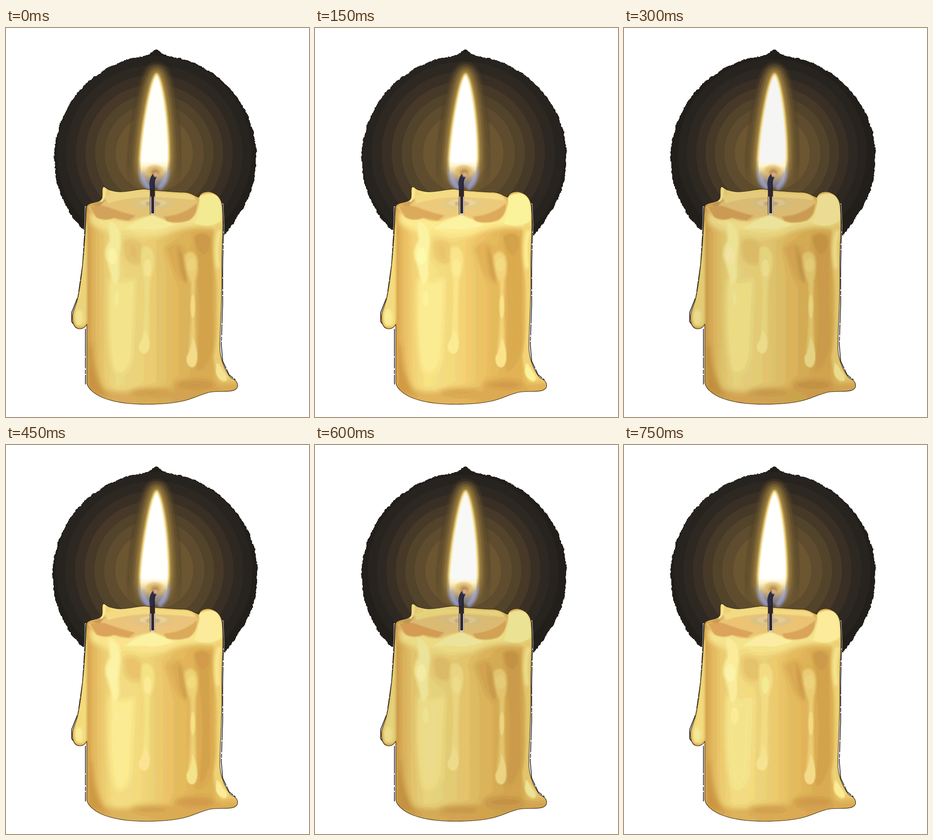
Write an HTML page that moves like this. It is 660 px wide and 848 px high and loops after 900 ms.

```html
<!DOCTYPE html>
<html lang="en">
<head>
<meta charset="utf-8">
<title>Candle</title>
<style>
  html, body { margin: 0; width: 100%; height: 100%; overflow: hidden; background: #fff; }
  svg { display: block; width: 660px; height: 848px; }
</style>
</head>
<body>
<svg viewBox="0 0 660 848" fill="none" stroke-linejoin="round" stroke-linecap="round">
  <defs>
    <filter id="soft1" x="-50%" y="-50%" width="200%" height="200%"><feGaussianBlur stdDeviation="1.2"/></filter>
    <filter id="soft3" x="-50%" y="-50%" width="200%" height="200%"><feGaussianBlur stdDeviation="2.4"/></filter>
    <filter id="soft8" x="-50%" y="-50%" width="200%" height="200%"><feGaussianBlur stdDeviation="6"/></filter>
    <filter id="tone" filterUnits="userSpaceOnUse" x="130" y="335" width="390" height="495" color-interpolation-filters="sRGB">
      <feComponentTransfer>
        <feFuncR class="gain" type="linear"/><feFuncG class="gain" type="linear"/><feFuncB class="gain" type="linear"/>
      </feComponentTransfer>
      <feComponentTransfer>
        <feFuncR class="step" type="discrete"/><feFuncG class="step" type="discrete"/><feFuncB class="step" type="discrete"/>
      </feComponentTransfer>
    </filter>

    <linearGradient id="wax" gradientUnits="userSpaceOnUse" x1="176" x2="472" y1="0" y2="0">
      <stop offset="0" stop-color="#d3a04a"/><stop offset=".05" stop-color="#deb35c"/>
      <stop offset=".12" stop-color="#e7c76d"/><stop offset=".22" stop-color="#eed981"/>
      <stop offset=".36" stop-color="#ecd57c"/><stop offset=".5" stop-color="#e8c96f"/>
      <stop offset=".63" stop-color="#e2bb60"/><stop offset=".8" stop-color="#daad54"/>
      <stop offset=".92" stop-color="#d9ac53"/><stop offset="1" stop-color="#e8c868"/>
    </linearGradient>
    <linearGradient id="flameFill" gradientUnits="userSpaceOnUse" x1="0" x2="0" y1="103" y2="352">
      <stop id="core0" offset="0"/><stop id="core1" offset=".75"/>
      <stop offset=".79" stop-color="#fff5cf"/><stop offset=".83" stop-color="#efd998"/>
      <stop offset=".88" stop-color="#c9ac72"/><stop offset=".92" stop-color="#a3968e" stop-opacity=".9"/>
      <stop offset=".97" stop-color="#8285a0" stop-opacity=".7"/><stop offset="1" stop-color="#6b6575" stop-opacity="0"/>
    </linearGradient>
    <linearGradient id="fade" gradientUnits="userSpaceOnUse" x1="0" x2="0" y1="285" y2="350">
      <stop stop-color="#fff"/><stop offset="1" stop-color="#000"/>
    </linearGradient>
    <mask id="upper" maskUnits="userSpaceOnUse" x="200" y="40" width="260" height="330">
      <path d="M200 40H460V370H200Z" fill="url(#fade)"/>
    </mask>

    <path id="flame" d="M328 103C336 112 344 155 348 195C352 235 354 270 352 305C351 330 345 348 332 352H312C299 348 292 330 293 300C294 265 300 215 308 172C314 140 321 110 328 103Z"/>
    <path id="body" d="M176 388C182 378 203 383 209 371C211 362 207 350 212 346C217 346 221 353 229 354C253 362 278 352 303 351C325 355 350 356 380 358C399 356 409 365 420 369C424 358 434 356 444 357C459 361 469 370 471 388C475 430 470 470 470 520C472 570 467 640 466 690C465 724 478 747 489 762C501 767 506 774 504 783C499 795 477 791 452 793C432 794 412 807 386 813C345 822 270 824 226 811C200 804 178 789 176 773V646C172 653 167 656 160 656C149 655 143 643 145 625C147 612 154 604 158 580C167 532 173 455 174 410Z"/>
    <clipPath id="inside"><use href="#body"/></clipPath>
    <clipPath id="haloEdge"><path id="haloClip"/></clipPath>
  </defs>

  <g id="halo" clip-path="url(#haloEdge)"></g>

  <!-- rough cut-out edge -->
  <g id="edges">
    <path d="M173 390V420L167 515L157 585L143 620V640L153 654M173 656V777"/>
    <path d="M472 384L474 430L472 520L472 600L469 690L472 726L486 756L500 767"/>
  </g>

  <!-- flame -->
  <g id="aura" mask="url(#upper)" filter="url(#soft1)"></g>
  <path d="M294 308Q290 335 310 350M352 308Q354 335 336 350" stroke="#8b91c4" stroke-width="8" opacity=".75" filter="url(#soft3)"/>
  <use href="#flame" fill="url(#flameFill)" filter="url(#soft1)"/>
  <g filter="url(#soft3)">
    <ellipse cx="324" cy="311" rx="18" ry="12" fill="#d9b468" opacity=".75"/>
    <ellipse cx="325" cy="315" rx="9" ry="8" fill="#b88e50"/>
    <path d="M299 318Q299 336 311 347M348 318Q347 335 334 347" stroke="#a0abe0" stroke-width="6" opacity=".7"/>
  </g>

  <!-- candle -->
  <g filter="url(#tone)">
    <use href="#body" fill="url(#wax)"/>
    <g clip-path="url(#inside)">
      <g filter="url(#soft8)">
        <path d="M170 768Q205 800 300 790T510 772V835H170Z" fill="#d4a34f" opacity=".8"/>
        <path d="M176 690V790L225 805Q192 770 186 690Z" fill="#c79443"/>
        <path d="M224 545Q250 565 282 545L274 720Q260 765 236 748Q218 700 224 545Z" fill="#f3e38c"/>
        <path d="M420 455Q440 445 447 465L450 690Q438 745 415 750Q430 600 414 520Z" fill="#cf9f4a" opacity=".85"/>
        <path d="M345 480Q375 455 390 480L392 550Q375 560 362 520Z" fill="#d6a752" opacity=".8"/>
        <path d="M255 465Q280 450 298 475V510Q275 525 258 500Z" fill="#e2bf6b"/>
        <ellipse cx="410" cy="777" rx="45" ry="10" fill="#c79245" opacity=".8"/>
        <ellipse cx="312" cy="793" rx="42" ry="8" fill="#c99849" opacity=".8"/>
        <path d="M182 400Q235 425 320 412T470 360V440Q400 425 345 452Q290 464 265 445Q215 452 184 425Z" fill="#f1e08a"/>
      </g>
      <g filter="url(#soft3)">
        <path d="M410 455Q428 440 444 457Q447 480 432 492Q414 490 410 455Z" fill="#cb9a48"/>
        <path d="M374 472Q387 495 391 520Q396 543 392 558Q376 540 374 472Z" fill="#cc9c4b"/>
        <path d="M178 440V780" stroke="#d09f4c" stroke-width="6"/>
        <path d="M222 420Q252 425 250 470Q244 510 247 540Q241 566 232 558Q225 520 217 502Q213 482 226 463Z" fill="#f5ea9c"/>
        <path d="M296 478Q318 470 323 500Q325 525 314 550Q310 615 313 690H294Q303 620 300 550Q291 515 296 478Z" fill="#efdc84"/>
        <path d="M389 495Q405 478 416 500Q421 525 413 550Q410 620 415 710H397Q405 635 402 555Q387 525 389 495Z" fill="#e8cb73"/>
        <path d="M456 425Q447 480 454 520Q462 560 459 620Q461 675 452 715Q455 758 472 772L490 764L466 720L474 430Z" fill="#e9cd72"/>
        <path d="M170 430Q168 530 155 595Q143 625 151 649Q174 659 176 639V420Z" fill="#ecd67c"/>
        <path d="M465 445Q456 475 462 520" stroke="#f3e28c" stroke-width="9"/>
        <ellipse cx="159" cy="631" rx="9" ry="17" fill="#f2e490"/>
        <ellipse cx="241" cy="590" rx="6" ry="18" fill="#f6e996"/>
      </g>
      <g filter="url(#soft1)">
        <path d="M302 655Q313 673 313 694Q310 711 300 710Q288 708 289 690Q300 678 302 655Z" fill="#f2e18f"/>
        <path d="M406 672Q417 695 417 720Q415 740 405 740Q392 738 393 717Q404 700 406 672Z" fill="#f0da88"/>
        <path d="M459 730Q466 734 473 748Q486 762 478 770Q461 768 457 750Z" fill="#f5e795"/>
        <ellipse cx="308" cy="523" rx="8" ry="19" fill="#f3e590"/>
        <ellipse cx="404" cy="517" rx="10" ry="15" fill="#ebd27c"/>
        <ellipse cx="232" cy="497" rx="10" ry="19" fill="#f9f0a6"/>
        <ellipse cx="407" cy="607" rx="5" ry="26" fill="#f0da84"/>
        <path d="M420 368Q440 354 460 365Q473 386 469 420Q442 439 410 425Q423 400 420 368Z" fill="#f4e896"/>
        <path d="M258 438Q290 415 320 408Q345 422 368 428Q330 443 305 438Z" fill="#f6eb9e"/>

        <!-- melted pool -->
        <path d="M178 390Q207 386 215 369Q245 362 300 357L395 361Q417 366 418 380Q417 407 400 419Q375 428 350 421Q330 407 316 408Q292 410 274 421Q250 423 235 414Q216 422 197 413Z" fill="#e5c074"/>
        <path d="M215 367Q260 358 300 357L395 361Q412 365 412 375Q360 369 310 368Q260 370 222 382Z" fill="#edd682"/>
        <path d="M183 390Q204 384 221 390Q248 401 282 409L267 420L235 414Q216 422 197 413Z" fill="#d6a358"/>
        <path d="M344 411Q387 408 416 382Q418 408 397 420Q371 428 350 421Z" fill="#d6a558"/>
        <path d="M186 386Q202 378 218 374L204 389Z" fill="#c69a55"/>
        <ellipse cx="320" cy="383" rx="46" ry="13" fill="#dcc080"/>
        <ellipse cx="321" cy="381" rx="31" ry="8" fill="#e2cb90"/>
        <ellipse cx="320" cy="383" rx="16" ry="6" fill="#cbae80"/>
        <path d="M214 349Q217 365 208 376" stroke="#f3e38f" stroke-width="6"/>
      </g>
    </g>
    <use href="#body" stroke="#3b2c12" stroke-width="1.2"/>
  </g>

  <!-- wick -->
  <path d="M319 406L319 345Q317 329 324 322" stroke="#2a2630" stroke-width="11" stroke-linecap="butt"/>
  <path d="M317 346Q314 330 324 323" stroke="#2d2d45" stroke-width="8"/>
  <path d="M315.5 405V368M323.5 405V368M315.5 405H323.5" stroke="#fff" stroke-width="1.5"/>
  <path d="M319 400V357" stroke="#3d241e" stroke-width="4"/>
  <circle cx="326" cy="320" r="5" fill="#d9a98c" filter="url(#soft1)"/>
</svg>

<script>
const FRAME_MS = 150;
const brightness = [1, 1.045, .965, 1.03, .975, 1.018];
const glowScale = [1, 1.04, .97, 1.01, .98, 1.01];
const cores = ['#fffffa', '#ffffff', '#f5f5f3', '#fffffd', '#f8f8f6', '#fffffd'];
const $ = id => document.getElementById(id);

function add(parent, tag, attributes) {
  const node = document.createElementNS('http://www.w3.org/2000/svg', tag);
  for (const key in attributes) node.setAttribute(key, attributes[key]);
  return parent.appendChild(node);
}

function seeded(seed) {
  return () => (seed = seed * 16807 % 2147483647) / 2147483647;
}

// Ragged disc, open behind the candle, with a small bump above the flame.
function haloPath(radiusX, centerX) {
  const random = seeded(71);
  const points = [];
  let drift = 0;
  for (let deg = 135; deg <= 407; deg += .6) {
    const angle = deg * Math.PI / 180;
    drift = drift * .7 + (random() - .5) * 2;
    let x = centerX + (radiusX + drift) * Math.cos(angle);
    let y = 283 + (223 + drift) * Math.sin(angle);
    if (deg < 360) y -= 12 * Math.exp(-(((x - 327) / 14) ** 2));
    if (deg > 395) y += (deg - 395) * .5;
    x = Math.round(x);
    y = Math.round(y);
    points.push(points.length ? `H${x}V${y}` : `M${x} ${y}`);
  }
  return points.join('') + 'Z';
}
const wideHalo = haloPath(223, 325);
const narrowHalo = haloPath(220, 325.5);

add($('halo'), 'rect', { x: 90, y: 40, width: 470, height: 420, fill: '#221f1b' });
const bands = [
  [212, '#27231e'], [192, '#2e2822'], [171, '#392f25'], [150, '#463928'],
  [129, '#52432b'], [108, '#5f4c2e'], [84, '#6b5631'], [56, '#735d34']
].map(([radius, fill]) => ({
  radius, node: add($('halo'), 'ellipse', { cx: 323, cy: 273, fill })
}));

const auraLayers = [
  [60, '#51432b', .4], [48, '#66532f', .6], [36, '#786136', .8],
  [25, '#8d733b', .95], [14, '#b3924b', 1], [7, '#f0d985', 1]
];
for (const [width, stroke, opacity] of auraLayers)
  add($('aura'), 'use', { href: '#flame', stroke, 'stroke-width': width, opacity });

for (const path of [...$('edges').children]) {
  const d = path.getAttribute('d');
  path.setAttribute('stroke', '#fff');
  path.setAttribute('stroke-width', 3);
  add($('edges'), 'path', {
    d, stroke: '#111', 'stroke-width': 1.5, 'stroke-dasharray': '60 2 24 3 9 2', 'stroke-linecap': 'butt'
  });
}

const LEVELS = 32;
const levels = Array.from({ length: LEVELS }, (_, i) => (i + .5) / LEVELS).join(' ');
document.querySelectorAll('.step').forEach(node => node.setAttribute('tableValues', levels));
const gains = document.querySelectorAll('.gain');

let shown = -1;
function draw() {
  const frame = Math.floor(performance.now() / FRAME_MS) % brightness.length;
  if (frame !== shown) {
    shown = frame;
    $('haloClip').setAttribute('d', frame ? wideHalo : narrowHalo);
    gains.forEach(node => node.setAttribute('slope', brightness[frame]));
    for (const { radius, node } of bands) {
      node.setAttribute('rx', radius * glowScale[frame]);
      node.setAttribute('ry', radius * glowScale[frame]);
    }
    $('core0').setAttribute('stop-color', cores[frame]);
    $('core1').setAttribute('stop-color', cores[frame]);
  }
  requestAnimationFrame(draw);
}
draw();
</script>
</body>
</html>
```
